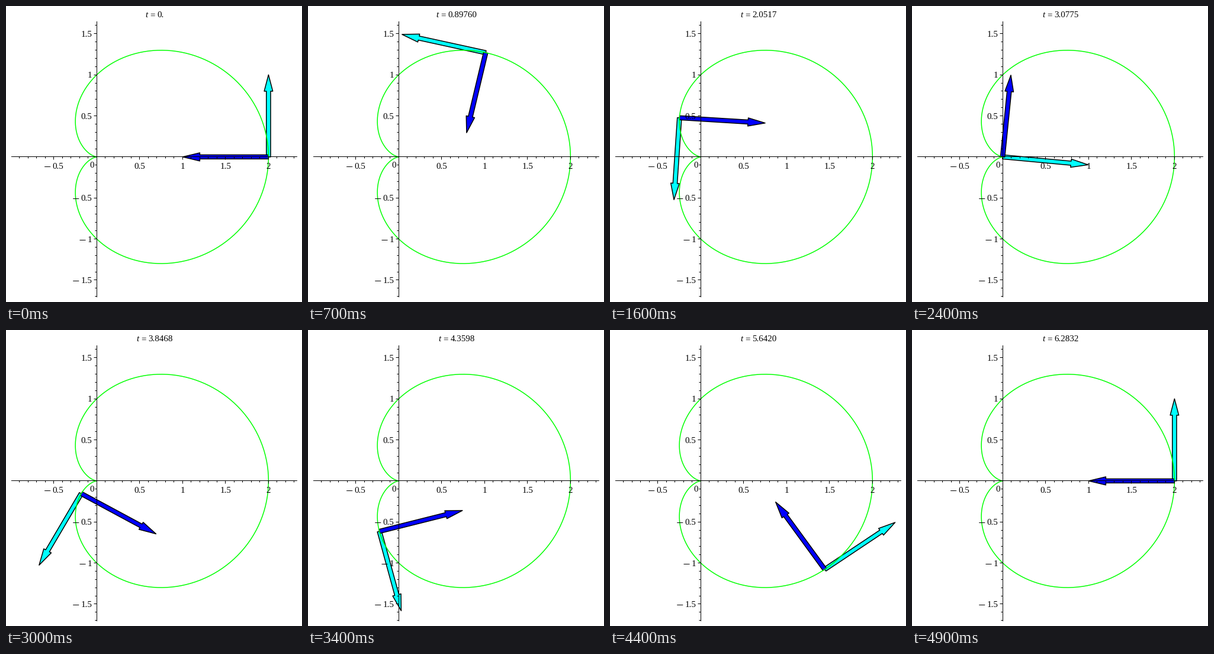
A matplotlib script for the animation above (5000 ms loop, 500 px wide and 500 px high).

```python
import numpy as np
import matplotlib.pyplot as plt
from matplotlib.animation import FuncAnimation
from matplotlib.patches import Polygon

SIZE, DPI = 500, 100
FRAMES, INTERVAL = 50, 100
PX = 72 / DPI                      # points per pixel
ORIGIN = np.array([153.4, 254.9])
SCALE = np.array([145, -138.7])
AXIS_X, AXIS_Y = np.floor(ORIGIN) + 0.5
FONT = 15
DIGIT, DOT = FONT * 0.5, FONT * 0.25

plt.rcParams["font.family"] = "Liberation Serif"
fig = plt.figure(figsize=(SIZE / DPI, SIZE / DPI), dpi=DPI, facecolor="white")
ax = fig.add_axes([0, 0, 1, 1])
ax.set(xlim=(0, SIZE), ylim=(SIZE, 0))
ax.axis("off")


def to_px(points):
    return ORIGIN + np.asarray(points) * SCALE


def line(x0, y0, x1, y1):
    ax.plot([x0, x1], [y0, y1], color="black", lw=PX, zorder=5,
            solid_capstyle="butt", snap=False)


def label(x, y, text, **style):
    return ax.text(x, y, text, fontsize=FONT * PX, va="baseline", zorder=6, **style)


def text_width(text):
    return sum(DOT if c == "." else DIGIT for c in text)


def number(right, baseline, value):
    text = f"{abs(value):g}"
    left = right - text_width(text)
    label(left, baseline, text)
    if value < 0:
        y = np.floor(baseline - 4) + 0.5
        line(left - 13, y, left - 3, y)


def draw_axes():
    line(9, AXIS_Y, 492, AXIS_Y)
    line(AXIS_X, 26, AXIS_X, 492)
    for i in range(-17, 24):
        x, y = np.floor(to_px((i / 10, i / 10))) + 0.5
        length = 5 if i % 5 == 0 else 3
        if i >= -9:
            line(x, AXIS_Y, x, AXIS_Y + length)
        if i <= 16:
            line(AXIS_X - length, y, AXIS_X, y)
    for value in (-0.5, 0.5, 1, 1.5, 2):
        width = text_width(f"{abs(value):g}") + (13 if value < 0 else 0)
        number(AXIS_X + value * SCALE[0] + width / 2, 275, value)
    for value in (-1.5, -1, -0.5, 0.5, 1, 1.5):
        number(145, round(ORIGIN[1] + value * SCALE[1] + 5), value)
    number(149, 273, 0)


def arrow_shape(base, direction):
    side = np.array([-direction[1], direction[0]])
    outline = [(0, 0.025), (0.8, 0.025), (0.8, 0.05), (1, 0),
               (0.8, -0.05), (0.8, -0.025), (0, -0.025)]
    return to_px([base + a * direction + b * side for a, b in outline])


def make_arrow(color, zorder):
    patch = Polygon(np.zeros((7, 2)), closed=True, fc=color, ec="black",
                    lw=1.5 * PX, joinstyle="round", zorder=zorder)
    return ax.add_patch(patch)


def cardioid(t):
    r = 1 + np.cos(t)
    return np.stack([r * np.cos(t), r * np.sin(t)], axis=-1)


draw_axes()
curve = to_px(cardioid(np.linspace(0, 2 * np.pi, 400)))
ax.plot(curve[:, 0], curve[:, 1], color="#00ff00", lw=1.5 * PX, zorder=4)
tangent_arrow = make_arrow("cyan", 2)
normal_arrow = make_arrow("blue", 3)
name = label(0, 19, "t", style="italic")
equals = label(0, 19, "=")
reading = label(0, 19, "")


def update(frame):
    t = 2 * np.pi * frame / (FRAMES - 1)
    base = cardioid(t)
    heading = 1.5 * t + np.pi / 2
    # The velocity reverses at the cusp.
    tangent = np.sign(np.cos(t / 2)) * np.array([np.cos(heading), np.sin(heading)])
    normal = np.array([-tangent[1], tangent[0]])
    tangent_arrow.set_xy(arrow_shape(base, tangent))
    normal_arrow.set_xy(arrow_shape(base, normal))

    text = "0." if frame == 0 else f"{t:.{5 if t < 1 else 4}f}"
    left = 251 - (20 + text_width(text)) / 2
    name.set_x(left)
    equals.set_x(left + 7.5)
    reading.set_x(left + 20)
    reading.set_text(text)
    return tangent_arrow, normal_arrow, name, equals, reading


anim = FuncAnimation(fig, update, frames=FRAMES, interval=INTERVAL,
                     repeat=True, repeat_delay=0, blit=False)
plt.show()
```
